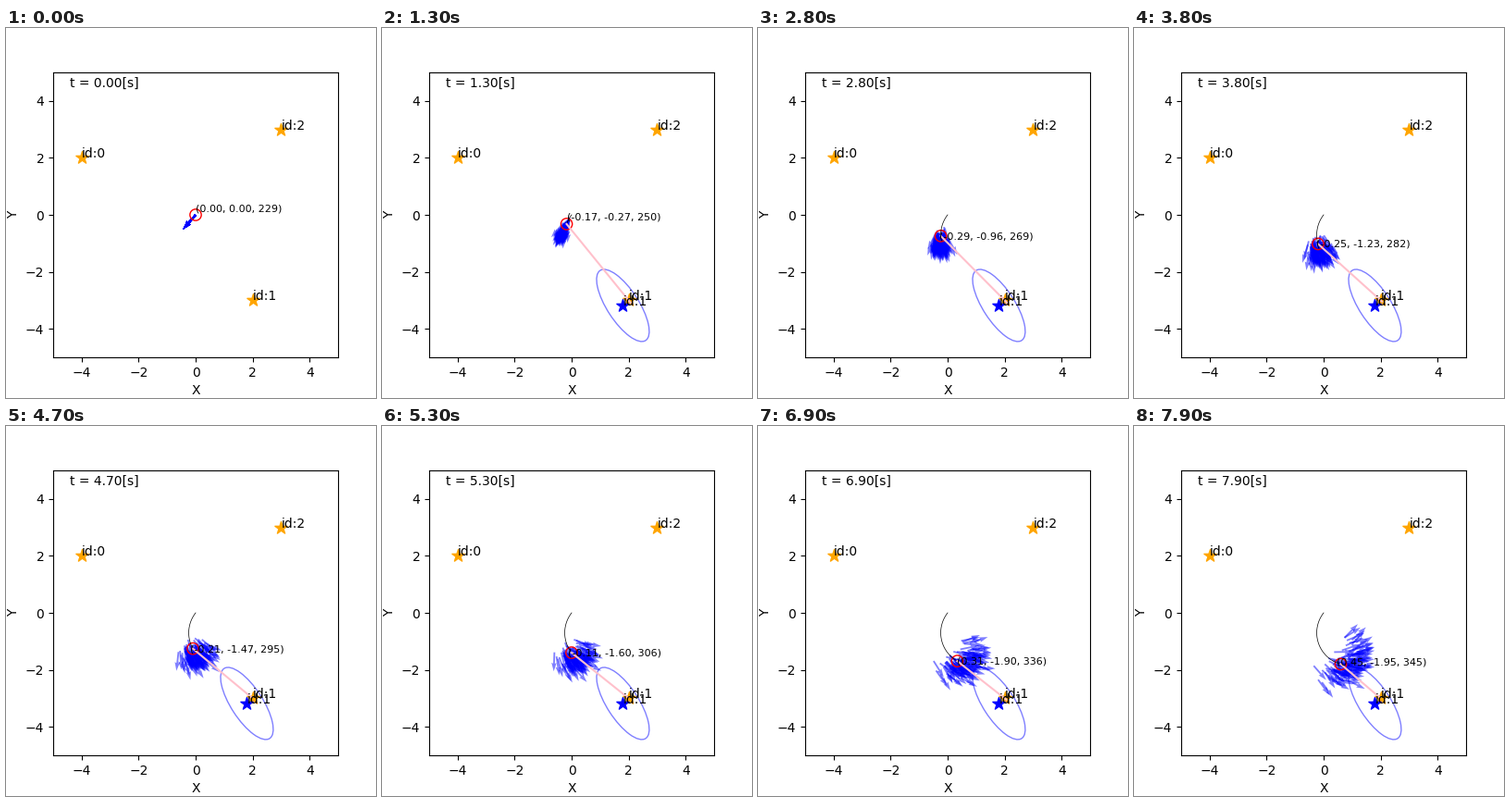
A matplotlib script that plays this animation: 400x400 px, repeating every 8000 ms.

```python
import matplotlib.pyplot as plt
import numpy as np
from matplotlib.animation import FuncAnimation
from matplotlib.patches import Circle, Ellipse

FRAMES, DT = 80, 0.1
SEEN_AT = 12  # step at which landmark 1 enters the field of view
LANDMARKS = [(-4, 2), (2, -3), (3, 3)]
MAPPED = (1.8, -3.18)

# Key poses of the estimate: time, x, y, heading in degrees
ESTIMATE = np.array([
    (0.0, 0, 0, 229),
    (1.3, -0.17, -0.27, 250),
    (2.8, -0.29, -0.96, 269),
    (4.7, -0.21, -1.47, 295),
    (6.0, -0.002, -1.75, 320),
    (6.9, 0.31, -1.90, 336),
    (7.9, 0.45, -1.95, 345),
])

rng = np.random.default_rng(4)
times = np.arange(FRAMES) * DT


def arc(t, speed, start, turn):
    """Position after driving a circular arc for time t (angles in degrees)."""
    start, turn = np.radians(start), np.radians(turn)
    radius, end = speed / turn, start + turn * t
    return (radius * (np.sin(end) - np.sin(start)),
            radius * (np.cos(start) - np.cos(end)))


def simulate(count=100, speed=0.295, start=229, turn=15.3):
    """Noisy motion model; returns x, y, heading per step and particle."""
    x, y = np.zeros((2, count))
    a = np.full(count, np.radians(start))
    steps = [(x, y, a)]
    for _ in range(FRAMES - 1):
        v = speed + rng.normal(0, 0.28, count)
        w = np.radians(turn) + rng.normal(0, 0.4, count)
        mid = a + w * DT / 2
        x = x + v * DT * np.cos(mid)
        y = y + v * DT * np.sin(mid)
        a = a + w * DT
        steps.append((x, y, a))
    return steps


path_x, path_y = arc(times, speed=0.284, start=232, turn=14.3)
particles = simulate()
reach = rng.normal(1, 0.03, FRAMES)  # measured relative to real distance

fig = plt.figure(figsize=(4, 4), dpi=100)
ax = fig.add_subplot(111)
ax.set_aspect("equal")


def star(pos, ident, color):
    ax.scatter(*pos, s=100, marker="*", color=color)
    ax.text(*pos, f"id:{ident}", fontsize=10)


def draw(i):
    t, x, y = times[i], path_x[i], path_y[i]
    ax.clear()
    ax.set(xlim=(-5, 5), ylim=(-5, 5))
    ax.set_xlabel("X", fontsize=10)
    ax.set_ylabel("Y", fontsize=10)
    ax.text(-4.4, 4.5, f"t = {t:.2f}[s]", fontsize=10)
    for ident, pos in enumerate(LANDMARKS):
        star(pos, ident, "orange")

    px, py, pa = particles[i]
    ax.quiver(px, py, np.cos(pa), np.sin(pa), angles="xy",
              scale_units="xy", scale=1.5, color="blue", alpha=0.5)
    ax.add_patch(Circle((x, y), 0.2, fill=False, color="red", zorder=1.5))
    ax.plot(path_x[:i + 1], path_y[:i + 1], color="black", linewidth=0.5)

    ex, ey, deg = (np.interp(t, ESTIMATE[:, 0], col)
                   for col in ESTIMATE.T[1:])
    ax.text(ex, ey + 0.1, f"({ex:.2f}, {ey:.2f}, {int(deg + 1e-6)})",
            fontsize=8)

    if i >= SEEN_AT:
        lx, ly = LANDMARKS[1]
        ax.plot([x, x + reach[i] * (lx - x)], [y, y + reach[i] * (ly - y)],
                color="pink")
        star(MAPPED, 1, "blue")
        ax.add_patch(Ellipse(MAPPED, 2.93, 1.11, angle=-57, fill=False,
                             color="blue", alpha=0.5))


anim = FuncAnimation(fig, draw, frames=FRAMES, interval=100, repeat=True,
                     repeat_delay=0)
plt.show()
```
